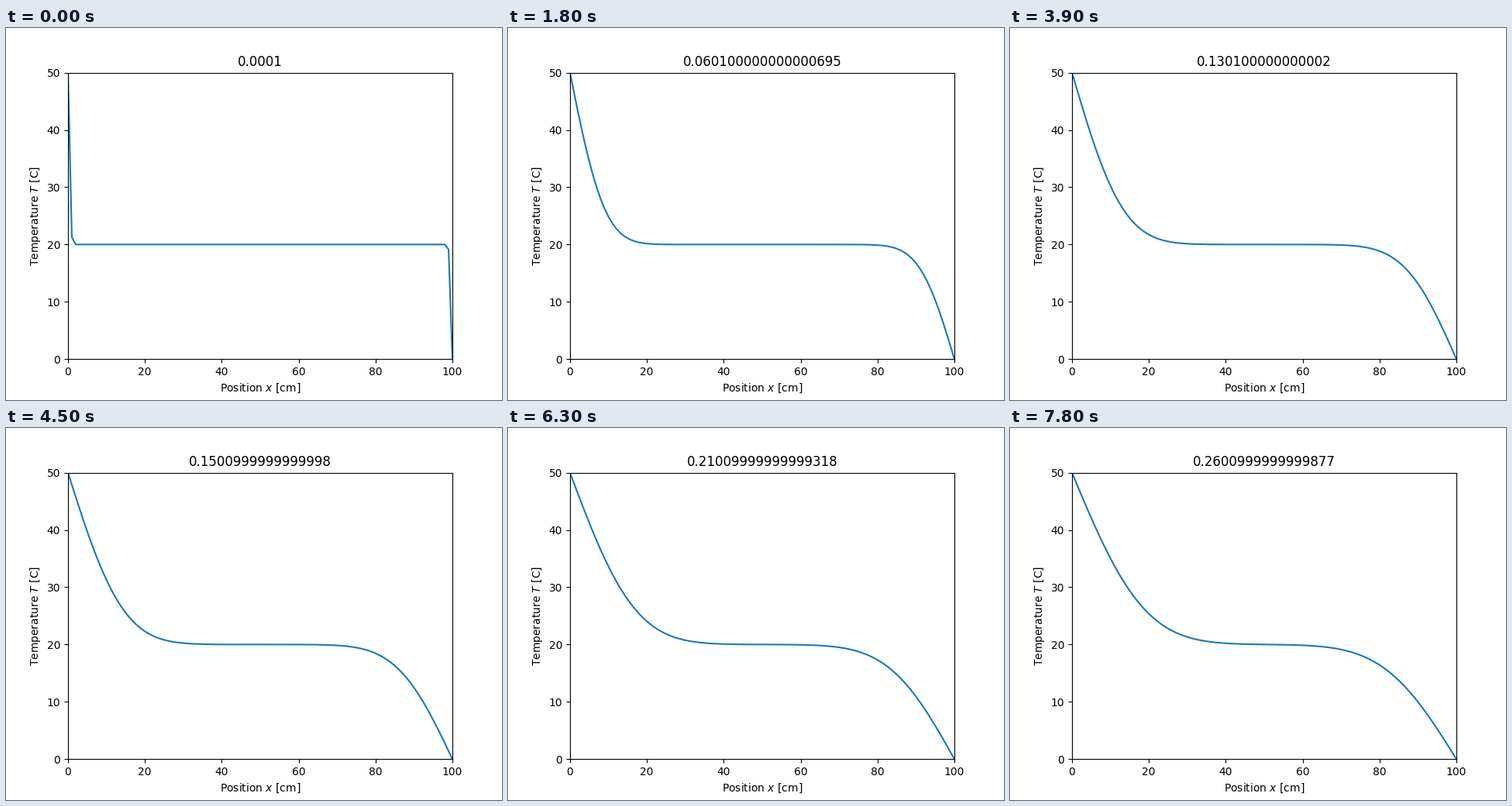
A matplotlib script for the animation above (8 s loop, 640 px wide and 480 px high).

```python
import numpy as np
import matplotlib.pyplot as plt
from matplotlib.animation import FuncAnimation

CELLS = 100
DIFFUSIVITY = 4.25e-6   # m^2/s
DX = 0.01 / CELLS       # m
DT = 1e-4               # s
STEPS_PER_STATE = 100
STATES = 27
FRAMES = 80
INTERVAL = 100          # ms
FRAMES_PER_STATE = 3


def simulate():
    """Explicit heat equation; returns (time, profile) for each shown state."""
    ratio = DIFFUSIVITY * DT / DX**2
    temp = np.full(CELLS + 1, 20.0)
    temp[0], temp[-1] = 50, 0
    time = 0.0
    states = []
    for step in range((STATES - 1) * STEPS_PER_STATE + 1):
        temp[1:-1] += ratio * (temp[:-2] + temp[2:] - 2 * temp[1:-1])
        time += DT  # rounding error builds up and shows in the title
        if step % STEPS_PER_STATE == 0:
            states.append((time, temp.copy()))
    return states


states = simulate()

fig, ax = plt.subplots(figsize=(6.4, 4.8), dpi=100)
line, = ax.plot(np.arange(CELLS + 1), states[0][1])
ax.set_xlim(0, 100)
ax.set_ylim(0, 50)
ax.set_xlabel("Position $x$ [cm]")
ax.set_ylabel("Temperature $T$ [C]")
title = ax.set_title(str(states[0][0]))


def update(frame):
    time, temp = states[frame // FRAMES_PER_STATE]
    line.set_ydata(temp)
    title.set_text(str(time))
    return line, title


anim = FuncAnimation(fig, update, frames=FRAMES, interval=INTERVAL,
                     repeat=True, repeat_delay=0, blit=False)
plt.show()
```
